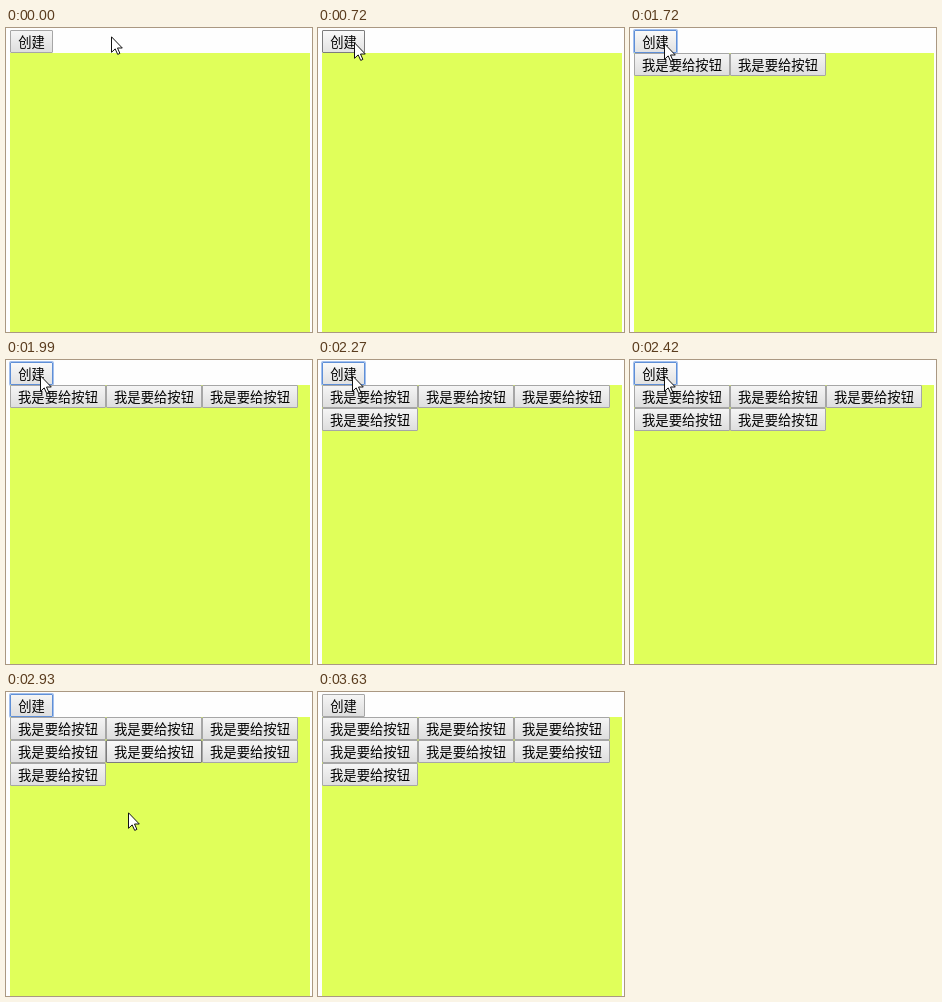
Recreate the animation shown at these times as an HTML page. Size 306 by 304 pixels, loop 3670 ms.

```html
<!DOCTYPE html>
<html lang="zh-CN">
<head>
<meta charset="utf-8">
<style>
  html, body { margin: 0; width: 100%; height: 100%; overflow: hidden; background: #fefefe; }
  #stage { position: relative; width: 306px; height: 304px; overflow: hidden; }
  #panel { position: absolute; left: 4px; top: 25px; width: 300px; height: 279px; background: #e0ff5a; }
  .btn {
    position: absolute; box-sizing: border-box; width: 96px; height: 23px;
    border: 1px solid #a6a6a6; border-radius: 1px;
    background: linear-gradient(#f5f5f5, #dedede);
    font: 13.333px/21px "Noto Sans CJK SC", "Noto Sans CJK", sans-serif;
    color: #000; text-align: center; white-space: nowrap;
  }
  #create { left: 4px; top: 2px; width: 43px; }
  .btn.hover { border-color: #7c7c7c; background: linear-gradient(#f9f9f9, #e2e2e2); }
  .btn.press { background: linear-gradient(#e3e3e3, #efefef); }
  .btn.focus { border-color: #5f8fd6; box-shadow: 0 0 0 1px #a3c0ee; }
  #cursor { position: absolute; left: 0; top: 0; width: 12px; height: 19px; }
</style>
</head>
<body>
<div id="stage">
  <div id="create" class="btn">创建</div>
  <div id="panel"></div>
  <svg id="cursor" viewBox="0 0 12 19">
    <path d="M.5 .8V16.3L4.2 12.9L6.7 18.4L8.9 17.4L6.5 12H11.3Z" fill="#fff" stroke="#111" stroke-width="1"/>
  </svg>
</div>
<script>
  const LOOP = 3670;
  const panel = document.getElementById('panel');
  const create = document.getElementById('create');
  const cursor = document.getElementById('cursor');

  // time, cursor x, cursor y, button state, created buttons
  const steps = [
    [0, 105, 8, '', 0],
    [420, 84, 4, '', 0],
    [570, 55, 4, '', 0],
    [720, 36, 14, 'hover', 0],
    [880, 34, 15, 'hover', 0],
    [1030, 34, 15, 'press', 0],
    [1170, 34, 15, 'hover', 1],
    [1570, 34, 15, 'press', 1],
    [1720, 34, 15, 'hover focus', 2],
    [1840, 34, 15, 'press focus', 2],
    [1990, 34, 15, 'hover focus', 3],
    [2120, 34, 15, 'press focus', 3],
    [2270, 34, 15, 'hover focus', 4],
    [2420, 34, 15, 'hover focus', 5],
    [2540, 34, 15, 'press focus', 5],
    [2690, 34, 15, 'hover focus', 6],
    [2810, 34, 15, 'press focus', 6],
    [2930, 122, 120, 'focus', 7],
    [3080, 271, 298, 'focus', 7],
    [3230, 320, 320, 'focus', 7],
    [3630, 320, 320, '', 7]
  ];

  const made = Array.from({ length: 7 }, (_, i) => {
    const b = document.createElement('div');
    b.className = 'btn';
    b.textContent = '我是要给按钮';
    b.style.left = (i % 3) * 96 + 'px';
    b.style.top = Math.floor(i / 3) * 23 + 'px';
    panel.append(b);
    return b;
  });

  function draw() {
    const t = performance.now() % LOOP;
    const [start, x, y, state, count] = steps.findLast(s => s[0] <= t);
    cursor.style.transform = `translate(${x}px, ${y}px)`;
    create.className = 'btn ' + state;
    made.forEach((b, i) => {
      b.style.visibility = i < count ? 'visible' : 'hidden';
    });
    // the pointer brushes this button on its way out
    made[4].classList.toggle('hover', start === 2930);
    requestAnimationFrame(draw);
  }
  draw();
</script>
</body>
</html>
```
